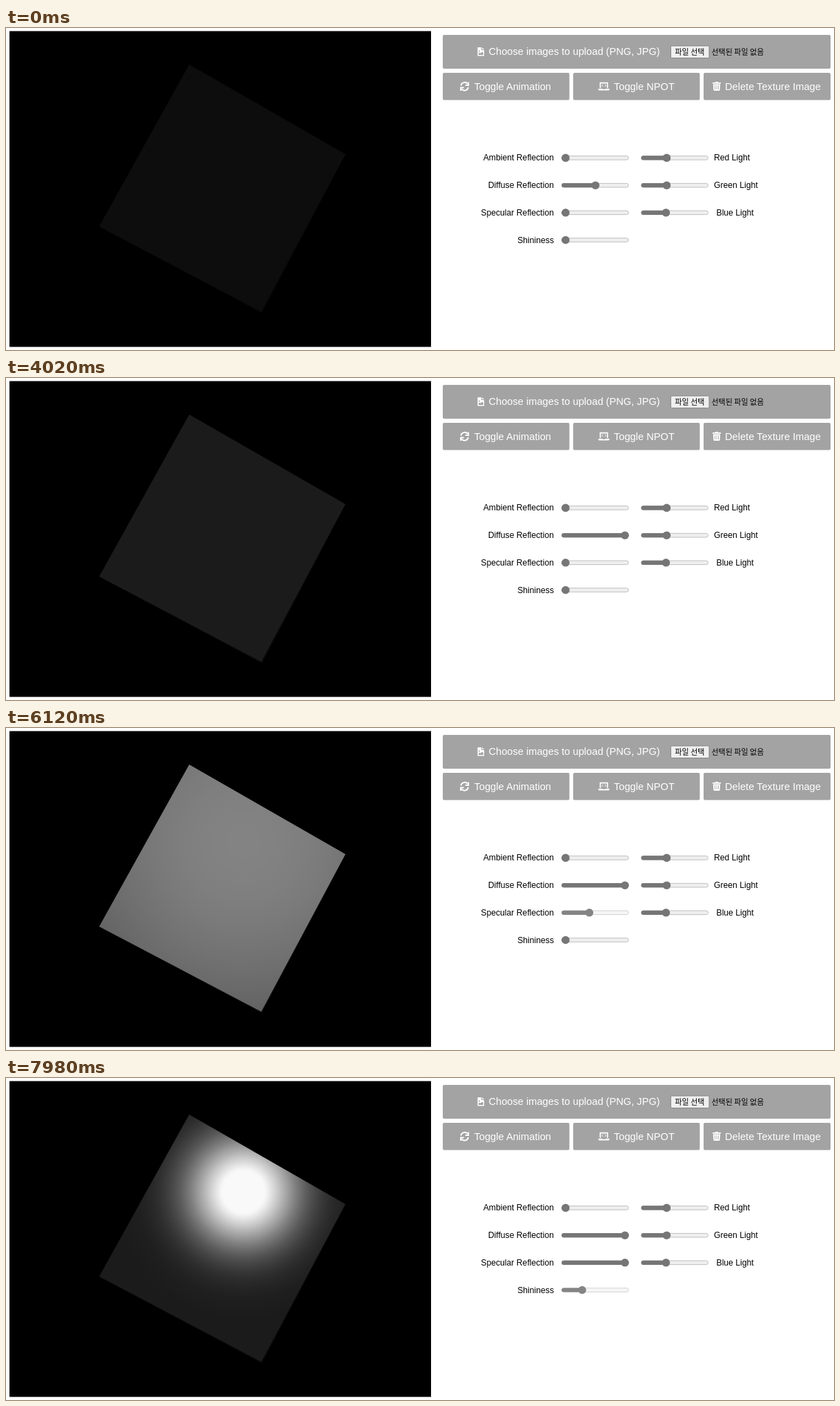
These frames come from a looping animation (1200 by 467 pixels, 8000 ms). An HTML page:

```html
<!DOCTYPE html>
<html lang="en">
<head>
<meta charset="utf-8">
<title>Lighting controls</title>
<style>
  html, body { margin: 0; width: 100%; height: 100%; overflow: hidden; background: #fff; }
  svg { display: block; width: 100vw; height: 100vh; }
  text { font-family: "Liberation Sans", Arial, sans-serif; }
  .button { fill: #a3a3a3; }
  .caption { fill: #fff; font-size: 14.65px; }
  .label { fill: #000; font-size: 12.2px; }
  .end { text-anchor: end; }
  .file { fill: #000; font: 11px "Noto Sans CJK KR", "Noto Sans CJK", sans-serif; }
</style>
</head>
<body>
<svg id="stage" viewBox="0 0 1200 467" preserveAspectRatio="none">
  <defs>
    <radialGradient id="light" gradientUnits="userSpaceOnUse" cx="344" cy="165" r="260"></radialGradient>
  </defs>
  <rect x="5" y="4.5" width="611" height="458"/>
  <path id="side" d="M135 288L371 414L492.500 183L370 411Z"/>
  <path d="M265.500 53L492 183L370 411.500L135 288Z" fill="url(#light)"/>

  <g class="button">
    <rect x="633" y="10" width="562" height="49" rx="2"/>
    <rect x="633" y="65" width="183.500" height="39.500" rx="2"/>
    <rect x="822" y="65" width="183.500" height="39.500" rx="2"/>
    <rect x="1011" y="65" width="184" height="39.500" rx="2"/>
  </g>
  <g class="caption">
    <text x="699.500" y="39">Choose images to upload (PNG, JPG)</text>
    <text x="678.500" y="89.500">Toggle Animation</text>
    <text x="881" y="89.500">Toggle NPOT</text>
    <text x="1042" y="89.500">Delete Texture Image</text>
  </g>

  <!-- picture file -->
  <path d="M683.500 28h5.500v4h4v8.500h-9.500z M690 28l3 3h-3z" fill="#fff"/>
  <path d="M685 39v-2l1.500-1.500 1.200 1.200 2.300-2.300 1.700 1.700v2.900z" fill="#a3a3a3"/>
  <circle cx="686" cy="33.500" r="1" fill="#a3a3a3"/>
  <!-- refresh arrows -->
  <g fill="none" stroke="#fff" stroke-width="1.900">
    <path d="M659.300 83.500a5.500 5.500 0 0 1 9.700-2.600M670 86a5.500 5.500 0 0 1-9.700 2.600"/>
    <path d="M670.200 78.500v4.500h-4.500M659.100 91v-4.500h4.500"/>
  </g>
  <!-- laptop -->
  <path d="M861.300 87v-7.300h10.400v7.300" fill="none" stroke="#fff" stroke-width="1.700"/>
  <path d="M858.500 88h5.500l.6 .8h3.800l.6-.8h5.500v1q0 1.500-1.500 1.500h-13q-1.500 0-1.500-1.500z" fill="#fff"/>
  <path d="M865.300 81.700l-1.700 1.800 1.700 1.800M867.800 81.700l1.700 1.800-1.700 1.800" fill="none" stroke="#fff"/>
  <!-- bin -->
  <path d="M1024 79h3.500l.7-1h3.600l.7 1h3.500v1.700h-12zM1024.800 81.500h10.400l-.6 8.200q-.1 1.300-1.400 1.300h-6.400q-1.300 0-1.400-1.300z" fill="#fff"/>
  <path d="M1027.500 83.200v6M1030 83.200v6M1032.500 83.200v6" stroke="#a3a3a3" stroke-width=".8"/>

  <rect x="963.500" y="26" width="55.500" height="17.500" rx="1.500" fill="#efefef" stroke="#767676" stroke-width=".8"/>
  <text class="file" x="969.500" y="38.500">파일 선택</text>
  <text class="file" x="1022.500" y="38.500">선택된 파일 없음</text>
</svg>
<script>
const LOOP = 8000, TICK = 60, MIN = 811, MAX = 897, RADIUS = 260, STOPS = 65;
const stage = document.getElementById("stage");
const light = document.getElementById("light");
const side = document.getElementById("side");

function add(parent, tag, attrs, text = "") {
  const node = document.createElementNS("http://www.w3.org/2000/svg", tag);
  for (const key in attrs) node.setAttribute(key, attrs[key]);
  node.textContent = text;
  parent.append(node);
  return node;
}

const looks = {
  rest: { fill: "#767676", track: "#efefef", edge: "#b2b2b2" },
  hover: { fill: "#616161", track: "#e5e5e5", edge: "#a5a5a5" },
  active: { fill: "#848484", track: "#f5f5f5", edge: "#c8c8c8" }
};

function slider(left, y, thumb) {
  const track = add(stage, "rect", { x: left + .5, y: y - 2.8, width: 96.5, height: 5.6, rx: 2.8, "stroke-width": .8 });
  const bar = add(stage, "rect", { x: left, y: y - 3.1, height: 6.2, rx: 3 });
  const knob = add(stage, "circle", { cy: y, r: 5.8 });
  return (x = thumb, state = "rest") => {
    const look = looks[state];
    track.setAttribute("fill", look.track);
    track.setAttribute("stroke", look.edge);
    bar.setAttribute("width", x - left);
    bar.setAttribute("fill", look.fill);
    knob.setAttribute("cx", x);
    knob.setAttribute("fill", look.fill);
  };
}

const rows = [188.4, 228.2, 267.8, 307.5];
["Ambient Reflection", "Diffuse Reflection", "Specular Reflection", "Shininess"].forEach((name, i) =>
  add(stage, "text", { class: "label end", x: 794, y: rows[i] + 4 }, name));
[["Red Light", 1026], ["Green Light", 1026], ["Blue Light", 1029.5]].forEach(([name, x], i) =>
  add(stage, "text", { class: "label", x, y: rows[i] + 4 }, name));

const [ambient, diffuse, specular, shininess] = rows.map(y => slider(805.2, y, MIN));
const [red, green, blue] = [957.5, 957.5, 956.5].map((x, i) => slider(920.5, rows[i], x));
[ambient, red, green, blue].forEach(draw => draw());

const stops = Array.from({ length: STOPS + 1 }, (_, i) => add(light, "stop", { offset: i / STOPS }));

// Each drag: first tick, last tick, thumb position reached.
const drags = {
  diffuse: [[1020, 1020, 858], [1380, 1500, 868], [2520, 2520, 883], [2580, 2700, 891], [3120, 3240, 897]],
  specular: [[4620, 5160, 897], [6000, 6240, 811], [6540, 6540, 815], [6600, 6720, 897]],
  shininess: [[7680, 7980, 835]]
};

function thumbAt(steps, start, time) {
  let x = start;
  for (const [from, to, goal] of steps) {
    if (time < from) break;
    const count = (to - from) / TICK + 1;
    const done = Math.min(count, Math.floor((time - from) / TICK) + 1);
    x += (goal - x) * done / count;
  }
  return x;
}

const states = {
  green: [[420, "hover"], [480, "rest"], [3480, "hover"], [3540, "rest"]],
  diffuse: [[480, "hover"], [540, "rest"], [840, "active"], [3480, "rest"]],
  specular: [[3900, "hover"], [4020, "rest"], [4440, "active"], [6900, "hover"], [7020, "rest"]],
  shininess: [[7260, "hover"], [7440, "active"]]
};
const stateAt = (list, time) => list.reduce((now, [at, state]) => time >= at ? state : now, "rest");

const level = x => (x - MIN) / (MAX - MIN);
const grey = v => `rgb(${v},${v},${v})`;

function shade(diff, spec, shine) {
  const falloff = 6.1e-6 * (1 + 93 * shine);
  stops.forEach((stop, i) => {
    const r = RADIUS * i / STOPS;
    const value = 26.5 * diff + 261 * spec * Math.exp(-falloff * r * r);
    stop.setAttribute("stop-color", grey(Math.min(249, Math.round(value))));
  });
  side.setAttribute("fill", grey(Math.round(9 * diff)));
}

function render(time) {
  const d = thumbAt(drags.diffuse, 854.3, time);
  const s = thumbAt(drags.specular, MIN, time);
  const n = thumbAt(drags.shininess, MIN, time);
  diffuse(d, stateAt(states.diffuse, time));
  specular(s, stateAt(states.specular, time));
  shininess(n, stateAt(states.shininess, time));
  green(undefined, stateAt(states.green, time));
  shade(level(d), level(s), level(n));
}

const began = performance.now();
function frame() {
  render((performance.now() - began) % LOOP);
  requestAnimationFrame(frame);
}
frame();
</script>
</body>
</html>
```
